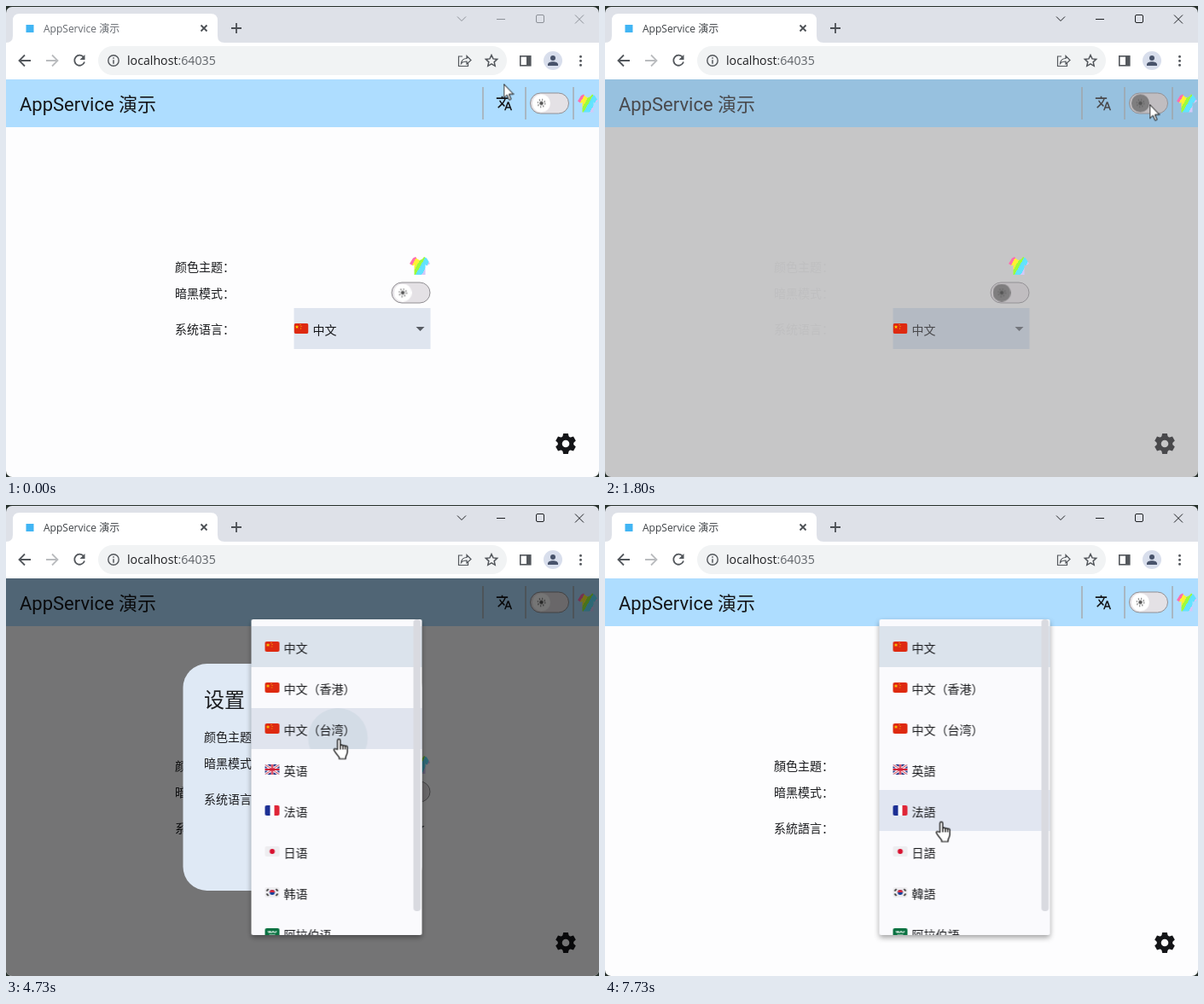
Recreate the animation shown at these times as an HTML page. Size 695 by 552 pixels, loop 8000 ms.

```html
<!DOCTYPE html>
<html lang="zh-CN">
<head>
<meta charset="utf-8">
<title>AppService 演示</title>
<script>
  // Registered colours interpolate inside keyframes.
  for (const name of ['bg', 'bar', 'fg', 'sep', 'track', 'rim', 'fill', 'tri', 'label', 'knob', 'ctl', 'tab'])
    CSS.registerProperty({ name: '--' + name, syntax: '<color>', inherits: true, initialValue: '#000' });
</script>
<style>
  html, body { margin: 0; width: 100%; height: 100%; overflow: hidden; background: #26302b; }
  svg { display: block; }
  #stage { animation: theme 8s linear infinite, label 8s linear infinite, knob 8s linear infinite, window 8s step-end infinite; }
  text { font: 14px Roboto, 'Noto Sans CJK SC', 'Noto Sans CJK JP', 'Noto Sans CJK', sans-serif; white-space: pre; }
  .ui { font-family: 'Open Sans', 'Noto Sans CJK SC', 'Noto Sans CJK', sans-serif; }
  .line { fill: none; stroke-width: 1.8; }
  .ctl { fill: none; stroke: var(--ctl); }

  @keyframes theme {
    0%, 9.94%, 23.1%, 100% {
      --bg: #fdfdfe; --bar: #aeddff; --fg: #141518; --sep: #a8b7c3;
      --track: #e4e1e5; --rim: #918f93; --fill: #dfe5ef; --tri: #585c63;
    }
    12.44%, 20.6% {
      --bg: #141516; --bar: #4d6475; --fg: #f4f4f6; --sep: #7b878f;
      --track: #4a4749; --rim: #99979a; --fill: #282f32; --tri: #c9cacc;
    }
  }
  /* Label text trails the theme and settles 200 ms after it. */
  @keyframes label {
    0%, 9.94%, 25.6%, 100% { --label: #1a1b1e; }
    11.2% { --label: #2c2d30; }
    12.44% { --label: #666668; }
    15%, 20.6% { --label: #e2e2e5; }
    22.5% { --label: #c0c0c1; }
    23.1% { --label: #9c9c9f; }
  }
  @keyframes knob {
    0%, 9.94%, 23.8%, 100% { --knob: #fff; }
    12.44%, 21.35% { --knob: #3b393c; }
    22.5% { --knob: #7e7d7e; }
  }
  @keyframes window {
    0% { --ctl: #8c9097; --tab: #666a70; }
    9%, 100% { --ctl: #1d1f22; --tab: #3f4347; }
  }

  .knob { animation: slide 8s ease-in-out infinite; }
  @keyframes slide {
    0%, 9.94%, 23.8%, 100% { transform: none; }
    12.44%, 21.35% { transform: translateX(17.5px); }
  }
  .sun { animation: sun 8s linear infinite; }
  .moon { animation: sun 8s linear infinite reverse; animation-name: moon; animation-direction: normal; }
  @keyframes sun { 0%, 9.94%, 23.8%, 100% { opacity: 1; } 11%, 22.6% { opacity: 0; } }
  @keyframes moon { 0%, 11.2%, 22.4%, 100% { opacity: 0; } 12.44%, 21.35% { opacity: 1; } }

  .sc { animation: sc 8s step-end infinite; }
  .tc { animation: tc 8s step-end infinite; }
  @keyframes sc { 0% { opacity: 1; } 63.2%, 100% { opacity: 0; } }
  @keyframes tc { 0% { opacity: 0; } 63.2%, 100% { opacity: 1; } }

  .page .box { fill: var(--fill); animation: focus 8s linear infinite; }
  @keyframes focus { 0%, 41.2%, 78%, 100% { opacity: 1; } 41.8%, 77.4% { opacity: 0; } }
  .dialog .box { fill: #c5d2e2; animation: hover 8s linear infinite; }
  @keyframes hover { 0%, 48.7% { opacity: 0; } 49.3%, 100% { opacity: 1; } }

  .halo { opacity: 0; animation: halo 8s linear infinite; }
  @keyframes halo { 0%, 35.6% { opacity: 0; } 36.2%, 40% { opacity: .08; } 41.4% { opacity: .2; } 43.5%, 100% { opacity: 0; } }

  .modal { animation: modal 8s linear infinite; }
  @keyframes modal {
    0% { opacity: 0; }
    41.2% { opacity: 0; animation-timing-function: ease-out; }
    43.1% { opacity: 1; }
    77.4% { opacity: 1; animation-timing-function: ease-in; }
    79.28%, 100% { opacity: 0; }
  }
  .press { animation: press 8s linear infinite; }
  @keyframes press { 0%, 70% { opacity: 0; } 70.6%, 73.2% { opacity: .08; } 75%, 100% { opacity: .19; } }

  /* --t is the moment a menu opens. */
  .sheet { fill: #fafafd; filter: drop-shadow(0 3px 3px rgba(0, 0, 0, .36)); animation: grow 8s var(--t) linear infinite backwards; }
  @keyframes grow { 0%, .94% { y: 8px; height: 48px; } 1.875%, 100% { y: 0; height: 370px; } }
  .item { animation: item 8s calc(var(--t) + 150ms + 15.8ms * var(--i)) linear infinite backwards; }
  @keyframes item { 0% { opacity: 0; } .3%, 100% { opacity: 1; } }
  .menu-a { --t: 4150ms; animation: menu-a 8s linear infinite; }
  .menu-b { --t: 6960ms; animation: menu-b 8s linear infinite; }
  @keyframes menu-a { 0%, 51.87% { opacity: 0; } 52.8%, 62.4% { opacity: 1; } 63.3%, 100% { opacity: 0; } }
  @keyframes menu-b { 0%, 87% { opacity: 0; } 87.94%, 100% { opacity: 1; } }

  .over-a { animation: over-a 8s linear infinite; }
  .over-b { animation: over-b 8s linear infinite; }
  .over-c { animation: over-c 8s linear infinite; }
  @keyframes over-a { 0%, 55% { opacity: 0; } 55.7%, 100% { opacity: 1; } }
  @keyframes over-b { 0%, 90.6% { opacity: 0; } 91.4%, 95% { opacity: 1; } 95.7%, 100% { opacity: 0; } }
  @keyframes over-c { 0%, 95% { opacity: 0; } 95.8%, 100% { opacity: 1; } }
  .ripple { animation: ripple 8s linear infinite; }
  @keyframes ripple { 0%, 58.5% { r: 0; } 58.6% { r: 20px; } 59.12% { r: 33px; } 60%, 100% { r: 130px; } }

  #cursor { animation: move 8s linear infinite; }
  @keyframes move {
    0%, .88% { transform: translate(583.5px, 91.5px); }
    4.1%, 5.9% { transform: translate(654px, 120px); }
    9.1%, 20% { transform: translate(644.5px, 118.5px); }
    22.5%, 29% { transform: translate(638.5px, 115.5px); }
    31.6% { transform: translate(584px, 300px); }
    34.1% { transform: translate(639.5px, 478.5px); }
    36.6%, 42.5% { transform: translate(655px, 512px); }
    46% { transform: translate(520px, 430px); }
    50%, 52.8% { transform: translate(392px, 345px); }
    55.6%, 62.8% { transform: translate(390px, 273.5px); }
    71.5%, 77.6% { transform: translate(434px, 408px); }
    79.1% { transform: translate(431px, 390.5px); }
    83.4% { transform: translate(407px, 384px); }
    84.1%, 95% { transform: translate(406px, 383px); }
    96.6%, 100% { transform: translate(394px, 370.5px); }
  }
  .arrow { animation: arrow 8s step-end infinite; }
  .hand { animation: hand 8s step-end infinite; }
  @keyframes arrow { 0% { opacity: 1; } 35.8% { opacity: 0; } 41.8% { opacity: 1; } 48.7% { opacity: 0; } 63.4% { opacity: 1; } 69.8%, 100% { opacity: 0; } }
  @keyframes hand { 0% { opacity: 0; } 35.8% { opacity: 1; } 41.8% { opacity: 0; } 48.7% { opacity: 1; } 63.4% { opacity: 0; } 69.8%, 100% { opacity: 1; } }
</style>
</head>
<body>
<svg id="stage" width="695" height="552" viewBox="0 0 695 552">
  <defs>
    <clipPath id="win"><rect y="1" width="695" height="551" rx="7"/></clipPath>
    <clipPath id="round"><rect width="17" height="12" rx="2"/></clipPath>
    <clipPath id="sheet"><rect width="200" height="370" rx="2"/></clipPath>
    <clipPath id="row"><rect y="104" width="200" height="48"/></clipPath>
    <linearGradient id="dye" x1="0" y1="2" x2="23" y2="15" gradientUnits="userSpaceOnUse"></linearGradient>
    <path id="shirt" fill="url(#dye)" d="M7 0 9 2.5 12 4 15 2.5 17 0 20 1.5 24 8 20 10.5 18.5 9V21H5.500V9L4 10.500 0 8 4 1.500Z"/>
    <g id="gear"></g>
    <g id="switch">
      <rect x=".5" y=".5" width="45" height="24" rx="12" fill="var(--track)" stroke="var(--rim)"/>
      <g class="knob">
        <circle cx="13.500" cy="12.500" r="10.500" fill="var(--knob)"/>
        <g class="sun" fill="#555"><circle cx="13.500" cy="12.500" r="2.200"/>
          <circle cx="13.500" cy="12.500" r="4.200" fill="none" stroke="#666" stroke-width="1.500" stroke-dasharray="1.300 2"/></g>
        <path class="moon" d="M13.500 9a4 4 0 1 1-4 4.500 3.300 3.300 0 0 0 4-4.500z" fill="none" stroke="#c8c8ca" stroke-width="1.300"/>
      </g>
    </g>
    <g id="cn" clip-path="url(#round)"><path d="M0 0h17v12H0z" fill="#de2910"/><path d="M3.500 2l.6 1.600h1.600L4.400 4.500l.5 1.600-1.400-1-1.400 1 .5-1.600L1.300 3.600h1.600z" fill="#ffde00"/><path d="M7 1.500h1M8 3.500h1M7.500 6h1" stroke="#ffb800"/></g>
    <g id="gb" clip-path="url(#round)"><path d="M0 0h17v12H0z" fill="#16267c"/><path d="M0 0 17 12M17 0 0 12M8.500 0v12M0 6h17" stroke="#fff" stroke-width="3.200"/><path d="M0 0 17 12M17 0 0 12" stroke="#d0203a"/><path d="M8.500 0v12M0 6h17" stroke="#d0203a" stroke-width="2"/></g>
    <g id="fr" clip-path="url(#round)"><path d="M0 0h6v12H0z" fill="#1c2f94"/><path d="M6 0h5v12H6z" fill="#fff"/><path d="M11 0h6v12h-6z" fill="#df2638"/></g>
    <g id="jp" clip-path="url(#round)"><path d="M0 0h17v12H0z" fill="#eeedf0"/><circle cx="8.500" cy="6" r="3" fill="#d8102f"/></g>
    <g id="kr" clip-path="url(#round)"><path d="M0 0h17v12H0z" fill="#eeedf0"/><circle cx="8.500" cy="6" r="3" fill="#18409a"/><path d="M5.500 6a3 3 0 0 1 6 0z" fill="#d32a3e"/><path d="M2 4.500 4 2M13 2l2 2.500M2 7.500 4 10M13 10l2-2.500" stroke="#333" stroke-width="1.800"/></g>
    <g id="sa" clip-path="url(#round)"><path d="M0 0h17v12H0z" fill="#0b7242"/><path d="M4 3v2h2V3v2h3V3M10 3v2h3V3M5 8h7" fill="none" stroke="#e4f1ea"/></g>
  </defs>

  <g clip-path="url(#win)">
    <rect width="695" height="86" fill="#dee1e8"/>
    <path d="M0 43h695v43H0zM0 43q8 0 8-8V17q0-8 8-8h224q8 0 8 8v18q0 8 8 8z" fill="#fff"/>
    <rect x="23.500" y="22" width="9" height="9" fill="#41b5f4"/>
    <text class="ui" x="44" y="31" style="font-size:12px" fill="var(--tab)">AppService 演示</text>
    <path d="m228.500 22.500 7 7m0-7-7 7M264 26h12m-6-6v12" class="line" stroke="#4b4f54" stroke-width="1.600"/>
    <path class="ctl" d="m529 12.500 5 5 5-5M575 15.500h10m82-5 10 10m0-10-10 10"/>
    <rect class="ctl" x="621.500" y="10.500" width="9" height="9" rx="1.500"/>

    <g class="line" stroke="#53575c">
      <path d="M29 64H16m6-6.500L15.500 64l6.500 6.500"/>
      <path d="M47 64h13m-6-6.500 6.500 6.500-6.500 6.500" stroke="#babcbf"/>
      <path d="M91 60a6 6 0 1 0 1 5.500"/><path d="M92.500 57v6H86.500z" fill="#53575c" stroke="none"/>
      <rect x="108" y="47" width="479" height="34" rx="17" fill="#f1f3f4" stroke="none"/>
      <circle cx="126" cy="64" r="6.200" stroke-width="1.400"/><path d="M126 60.300v1.500m0 1.500v4.500" stroke-width="1.500"/>
      <path d="M535 59h-4.500v11.500h11V67M533.500 67.500c.5-4 3-6 6.500-6v-3l5 5-5 4.500v-3c-3 0-5 .5-6.500 2.500z" stroke-width="1.200"/>
      <path d="m569 57.500 2 4.400 4.700.5-3.500 3.200 1 4.700-4.200-2.400-4.200 2.400 1-4.700-3.500-3.200 4.700-.5z" stroke-width="1.500"/>
      <rect x="602.800" y="58.800" width="12" height="11" stroke-width="1.600"/><path d="M610 58h5v12h-5z" fill="#53575c" stroke="none"/>
    </g>
    <text class="ui" x="142" y="69" style="font-size:14.200px" fill="#202124">localhost<tspan fill="#5f6368">:64035</tspan></text>
    <circle cx="641" cy="64" r="11" fill="#d8deec"/>
    <path d="M635 70v-1.500c0-4.500 12-4.500 12 0V70z" fill="#48536b"/><circle cx="641" cy="61" r="3" fill="#48536b"/>
    <path d="M673.500 59.300v.01M673.500 64.300v.01M673.500 69.300v.01" stroke="#53575c" stroke-width="3" stroke-linecap="round"/>

    <g class="page">
      <rect y="86" width="695" height="466" fill="var(--bg)"/>
      <rect y="86" width="695" height="56" fill="var(--bar)"/>
      <text x="16" y="123" style="font-size:22px" fill="var(--fg)">AppService 演示</text>
      <path d="M559 95v38M609 95v38M665 95v38" stroke="var(--sep)" stroke-width="2"/>
      <path transform="translate(574 104) scale(.833)" fill="var(--fg)" d="M12.870 15.070l-2.540-2.510.03-.03c1.740-1.940 2.980-4.170 3.710-6.530H17V4h-7V2H8v2H1v1.990h11.170C11.500 7.920 10.440 9.750 9 11.350 8.070 10.320 7.300 9.190 6.690 8h-2c.73 1.630 1.730 3.170 2.980 4.560l-5.090 5.020L4 19l5-5 3.110 3.110.76-2.040zM18.500 10h-2L12 22h2l1.120-3h4.750L21 22h2l-4.500-12zm-2.620 7l1.620-4.330L19.120 17h-3.240z"/>
      <use href="#switch" x="614" y="101.500"/>
      <use href="#shirt" x="670" y="103.500"/>
      <circle class="halo" cx="656" cy="513" r="23"/>
      <use href="#gear" x="656" y="513" fill="var(--fg)" stroke="var(--fg)"/>
      <g id="home"></g>
    </g>

    <g class="modal">
      <rect y="86" width="695" height="466" opacity=".54"/>
      <g class="dialog">
        <rect x="207.500" y="186" width="280" height="266" rx="28" fill="#dfe9f5"/>
        <text x="232" y="236.500" style="font-size:24px" fill="#1a1b1e"><tspan class="title">設置</tspan></text>
        <g id="prefs"></g>
        <rect class="press" x="408" y="391" width="52" height="40" rx="20" fill="#00557f"/>
        <g id="close"></g>
      </g>
    </g>
    <g id="menus"></g>
    <g id="cursor" stroke="#000" fill="#fff" stroke-linejoin="round">
      <path class="arrow" d="M0 0v16.300l3.700-3.500 2.600 5.900 2.300-1-2.600-5.800h5.300z"/>
      <path class="hand" transform="translate(-6.500)" stroke-width="1.200" d="M5 13V2.500a1.700 1.700 0 0 1 3.400 0V8.500a1.600 1.600 0 0 1 3 .4 1.500 1.500 0 0 1 2.700.6 1.400 1.400 0 0 1 2.500 1.200V16c0 2.500-1.500 4-2 6v2H7v-2C5 19.500 2.500 17 1 14c-.8-1.600 1-2.600 2.200-1.500zM8.400 8.500V13M11.400 9v4M14.100 9.500V13"/>
    </g>
  </g>
</svg>
<script>
  const $ = s => document.querySelector(s);
  const text = (x, y, s, fill, cls = '') => `<text x="${x}" y="${y}" fill="${fill}" class="${cls}">${s}</text>`;
  // Simplified wording first, traditional after the language changes.
  const pair = (x, y, a, b, fill) => text(x, y, a, fill, 'sc') + text(x, y, b, fill, 'tc');
  const use = (id, x, y, extra = '') => `<use href="#${id}" x="${x}" y="${y}" ${extra}/>`;

  const dyes = ['#ff6fae', '#fff133', '#9dfb3c', '#62e3ff', '#d3c8f8'];
  const cuts = [0, 24, 43, 58, 82, 100];
  $('#dye').innerHTML = dyes.map((c, i) =>
    `<stop offset="${cuts[i]}%" stop-color="${c}"/><stop offset="${cuts[i + 1]}%" stop-color="${c}"/>`).join('');

  $('#gear').innerHTML = '<circle r="6.800" fill="none" stroke-width="5"/>' + Array.from({ length: 6 }, (_, i) =>
    `<path transform="rotate(${i * 60})" stroke="none" d="M-4 -7 -2.800 -12h5.600L4 -7z"/>`).join('');

  function settings(left, right, dy, value) {
    const row = (y, a, b) => pair(left, y + dy, a, b, 'var(--label)');
    return row(311, '颜色主题：', '顏色主題：') + row(342, '暗黑模式：', '暗黑模式：') + row(384, '系统语言：', '系統語言：') +
      use('shirt', right - 24.5, 294 + dy) + use('switch', right - 46, 323.5 + dy) +
      `<rect class="box" x="${right - 160}" y="${354 + dy}" width="160" height="48"/>` +
      use('cn', right - 160, 372 + dy) + value(right - 138, 385 + dy) +
      `<path d="M${right - 17} ${376 + dy}h10l-5 5z" fill="var(--tri)"/>`;
  }
  $('#home').innerHTML = settings(198, 497.5, 0, (x, y) => text(x, y, '中文', 'var(--fg)'));
  $('#prefs').innerHTML = settings(232, 464, -34, (x, y) => pair(x, y, '中文', '中文（台湾）', '#1a1b1e'));
  $('.title').parentNode.outerHTML = ['sc', 'tc'].map((c, i) =>
    `<text x="232" y="236.500" style="font-size:24px" fill="#1a1b1e" class="${c}">${['设置', '設置'][i]}</text>`).join('');
  $('#close').innerHTML = pair(420, 416, '关闭', '關閉', '#00658f');

  const flags = ['cn', 'cn', 'cn', 'gb', 'fr', 'jp', 'kr', 'sa'];
  const names = yu => ['中文', '中文（香港）', '中文（台湾）', ...['英', '法', '日', yu === '語' ? '韓' : '韩', '阿拉伯'].map(s => s + yu)];
  const band = (i, cls, fill) => `<rect class="${cls}" y="${8 + 48 * i}" width="200" height="48" fill="${fill}"/>`;

  function menu(cls, x, words, hover) {
    const items = words.map((w, i) =>
      `<g class="${i ? 'item' : ''}" style="--i:${i + 1}">` +
      use(flags[i], 16, 26 + 48 * i) + text(38, 39 + 48 * i, w, '#1a1b1e') + '</g>').join('');
    return `<g transform="translate(${x} 134)"><g class="${cls}"><rect class="sheet" width="200" height="370" rx="2"/>
      <g clip-path="url(#sheet)">${band(0, '', '#dbe3ec')}${hover}${items}
      <rect class="item" style="--i:0" x="190" width="8.500" height="342" rx="4" fill="#d9dae0" opacity=".9"/></g></g></g>`;
  }
  $('#menus').innerHTML =
    menu('menu-a', 287.5, names('语'), band(2, 'over-a', '#e0e4ee') +
      '<g clip-path="url(#row)"><circle class="ripple" cx="101.500" cy="139" r="0" fill="#d3dce6"/></g>') +
    menu('menu-b', 321.5, names('語'), band(5, 'over-b', '#e1e6f1') + band(4, 'over-c', '#e1e6f1'));
</script>
</body>
</html>
```
